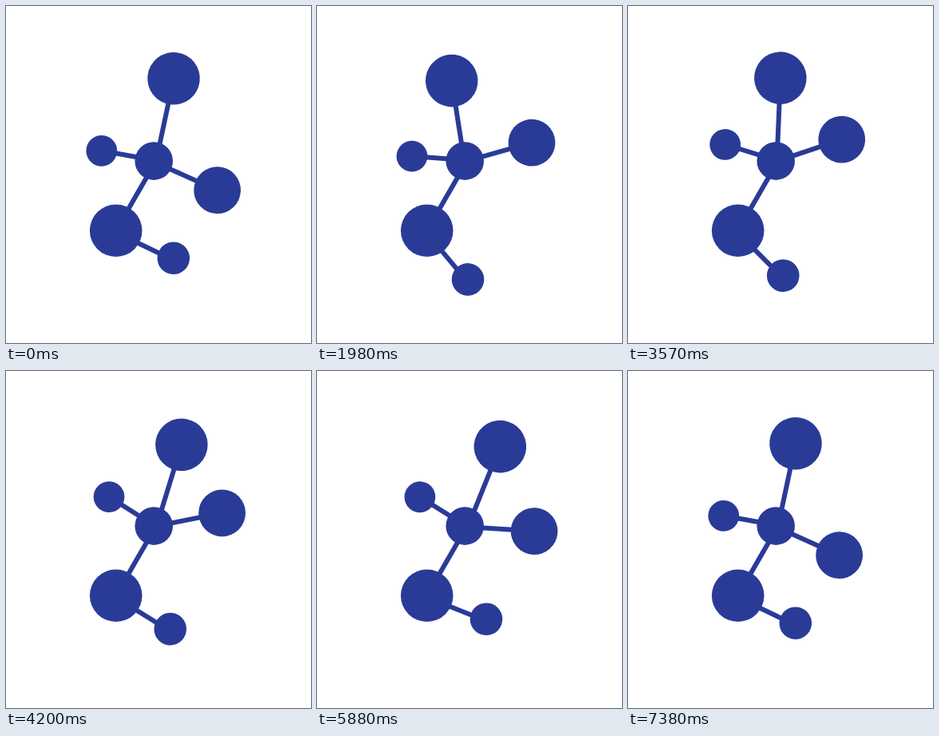
Animation of 382 by 422 pixels, one loop 7.41 s. Source, as an HTML page:

```html
<!DOCTYPE html>
<html lang="en">
<head>
<meta charset="utf-8">
<title>Molecule</title>
<style>
  html, body { margin: 0; width: 100%; height: 100%; overflow: hidden; background: #fff; }
  svg { display: block; width: 382px; height: 422px; }
  circle { fill: #2a3b97; }
  line { stroke: #2a3b97; stroke-width: 6; }
</style>
</head>
<body>
<svg viewBox="0 0 382 422">
  <line x1="137.7" y1="281.2" x2="188" y2="194"/>
  <g id="top"><line x1="-10" y1="-10.5" y2="-114"/><circle cy="-114" r="32.8"/></g>
  <g id="right"><line x2="87.3"/><circle cx="87.3" r="29.4"/></g>
  <g id="left"><line x2="-66.25"/><circle cx="-66.25" r="19.4"/></g>
  <g id="low"><line y1="2.2" x2="80.1" y2="2.2"/><circle cx="80.1" r="20.3"/></g>
  <circle cx="185.2" cy="194.1" r="23.8"/>
  <circle cx="137.7" cy="281.2" r="32.8"/>
</svg>
<script>
const LOOP = 7410, STEP = 30, HOLD = 210;
const STEPS = (LOOP - HOLD) / STEP;

// Each arm swings from its rest angle through two turning points and back.
function makeArm(id, x, y, rest, ...turns) {
  const keys = [{ at: 0, angle: rest }, ...turns, { at: STEPS, angle: rest }];
  return { node: document.getElementById(id), x, y, keys };
}

const arms = [
  makeArm('top', 197.1, 204, 6.5, { at: 79, angle: -18 }, { at: 160, angle: 21 }),
  makeArm('right', 185, 194.9, 24.2, { at: 83, angle: -25 }, { at: 157, angle: -7.2 }),
  makeArm('left', 185, 193, 10.15, { at: 81, angle: 3.05 }, { at: 160, angle: 42.3 }),
  makeArm('low', 137.6, 281, 25.7, { at: 83, angle: 55.7 }, { at: 165, angle: 20.4 })
];

const ease = u => u * u * (3 - 2 * u);

function angleAt(keys, step) {
  const next = keys.findIndex(key => key.at > step);
  if (next < 0) return keys[keys.length - 1].angle;
  const a = keys[next - 1], b = keys[next];
  return a.angle + (b.angle - a.angle) * ease((step - a.at) / (b.at - a.at));
}

function draw(ms) {
  const t = ms % LOOP;
  const step = t < HOLD ? 0 : Math.floor((t - HOLD) / STEP) + 1;
  for (const { node, x, y, keys } of arms) {
    node.setAttribute('transform', `translate(${x} ${y}) rotate(${angleAt(keys, step).toFixed(3)})`);
  }
}

const start = performance.now();
function tick() {
  draw(performance.now() - start);
  requestAnimationFrame(tick);
}
draw(0);
requestAnimationFrame(tick);
</script>
</body>
</html>
```
